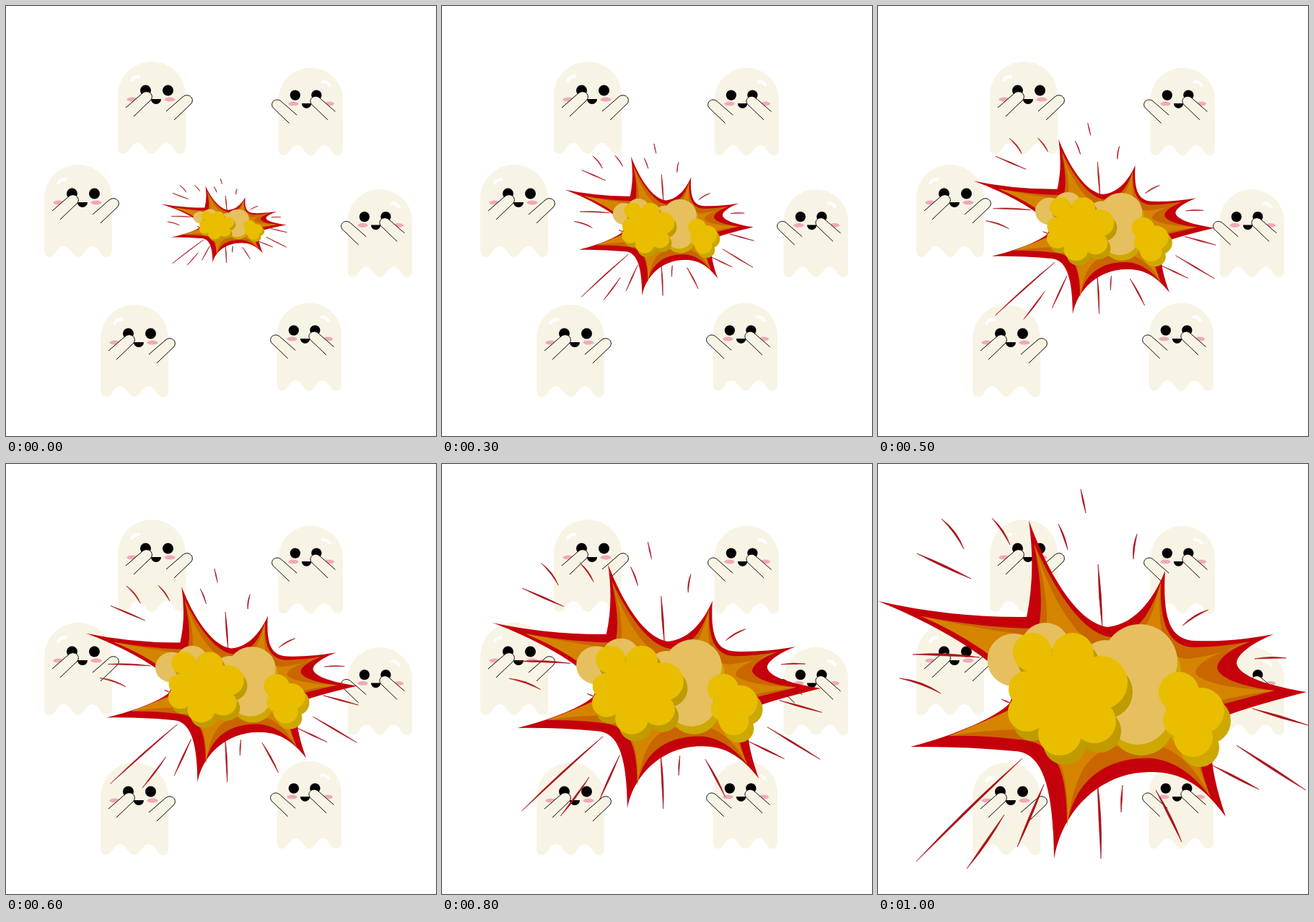
An HTML page that plays this animation: 596 by 596 pixels, repeating every 1100 ms.

```html
<!DOCTYPE html>
<html>
<head>
<meta charset="utf-8">
<style>
  html, body { margin: 0; width: 100%; height: 100%; overflow: hidden; background: #fff; }
  svg { display: block; width: 100vw; height: 100vh; }
</style>
</head>
<body>
<svg viewBox="0 0 596 596">
  <defs>
    <g id="arm" fill="#f8f4e5" stroke="#000">
      <path d="M11 64L34 44C41 38 51 45 46 53L22 76"/>
    </g>
    <g id="ghost">
      <path fill="#f8f4e5" d="M0 47A47 47 0 0 1 94 47V119Q94 128 86 128C78 128 76 113 67 113S55 128 47 128S36 113 27 113S16 128 8 128Q0 128 0 119Z"/>
      <path d="M19.500 25.500Q23 20 29 20.500" fill="none" stroke="#fff" stroke-width="4.500" stroke-linecap="round"/>
      <g fill="#f0a9b9">
        <ellipse cx="20" cy="52.500" rx="7.500" ry="3"/>
        <ellipse cx="72" cy="52.500" rx="7.500" ry="3"/>
      </g>
      <circle cx="38.500" cy="40" r="7.500"/>
      <circle cx="69.500" cy="40" r="7.500"/>
      <path d="M46 52H60A7 7 0 0 1 46 52"/>
      <use href="#arm"/>
      <use href="#arm" x="56" y="5"/>
    </g>
    <g id="puff">
      <circle cx="214" cy="261" r="27"/>
      <circle cx="270" cy="263" r="29"/>
      <circle cx="309" cy="303" r="37"/>
      <circle cx="300" cy="357" r="30"/>
      <circle cx="252" cy="374" r="30"/>
      <circle cx="207" cy="344" r="27"/>
      <circle cx="206" cy="312" r="25"/>
      <circle cx="250" cy="315" r="50"/>
    </g>
    <g id="smallPuff">
      <circle cx="417" cy="316" r="28"/>
      <circle cx="448" cy="342" r="32"/>
      <circle cx="437" cy="379" r="27"/>
      <circle cx="418" cy="355" r="23"/>
    </g>
    <g id="column">
      <circle cx="363" cy="274" r="52"/>
      <circle cx="360" cy="344" r="45"/>
      <path d="M315 274H414L404 344H315Z"/>
    </g>
  </defs>

  <use href="#ghost" x="155" y="77"/>
  <use href="#ghost" x="53" y="220"/>
  <use href="#ghost" x="131" y="414"/>
  <use href="#ghost" transform="translate(467 85.500) scale(-.952 .952)"/>
  <use href="#ghost" transform="translate(563 254) scale(-.952 .952)"/>
  <use href="#ghost" transform="translate(465 411.500) scale(-.952 .952)"/>

  <g id="burst">
    <path id="rays" fill="#a91319" stroke="#a91319" stroke-width=".6" vector-effect="non-scaling-stroke"/>
    <path fill="#c4000b" d="M0 190Q100 213 206 212Q219 150 209 78C235 150 275 220 318 226C360 222 385 180 398 148C394 215 405 244 440 245Q490 247 548 236C515 250 497 265 497 276C500 295 545 308 594 316Q520 335 485 348C455 360 455 410 482 489C450 445 420 427 380 427C310 425 255 480 244 547C243 480 238 400 190 398Q120 391 45 392C110 375 165 350 182 332Q192 312 182 300C150 265 80 222 0 190Z"/>
    <path fill="#c96600" d="M60 211Q150 228 222 228Q232 190 216 110C245 175 285 238 325 240C365 236 382 195 392 164C390 225 405 254 440 254Q480 253 515 246C485 258 470 272 470 283C475 300 515 310 550 314Q470 335 450 340Q430 380 461 462C430 420 400 410 380 408C310 405 270 445 262 503C262 440 255 385 195 382Q150 376 98 377Q190 350 210 330V300Q150 250 60 211Z"/>
    <path fill="#d58400" d="M60 211Q160 233 232 240Q240 190 216 110C240 190 280 255 325 260C370 250 382 205 392 164C385 240 400 270 430 270Q475 265 515 246C470 262 440 275 440 290C450 305 500 312 550 314Q470 325 440 340Q425 380 461 462C430 400 390 385 370 390C300 385 275 410 262 503C268 420 240 370 200 368Q150 368 98 377Q190 340 220 320Q150 250 60 211Z"/>
    <use href="#column" x="5" y="15" fill="#cda800"/>
    <g fill="#e6bf5f">
      <circle cx="188" cy="271.500" r="36.500"/>
      <circle cx="232" cy="254" r="34"/>
      <circle cx="315" cy="277" r="33"/>
      <use href="#column"/>
    </g>
    <use href="#puff" x="7" y="13" fill="#bf9b00"/>
    <use href="#puff" fill="#e9bd00"/>
    <use href="#smallPuff" x="9" y="14" fill="#cda800"/>
    <use href="#smallPuff" fill="#e9bd00"/>
  </g>
</svg>
<script>
  // Each ray: start x, y, end x, y, sideways bend.
  const rays = [
    [281, 35, 288, 68, 0], [88, 76, 119, 118, -6], [158, 75, 183, 112, -4],
    [250, 83, 263, 119, -2], [359, 97, 354, 132, 3], [54, 124, 129, 159, 0],
    [305, 139, 311, 228, 0], [458, 202, 422, 224, 4], [522, 270, 566, 269, -2],
    [48, 264, 141, 268, -3], [30, 297, 87, 318, -6], [519, 339, 596, 362, 0],
    [171, 326, 185, 332, 0], [497, 390, 593, 452, 0], [464, 418, 528, 451, 0],
    [200, 408, 53, 551, 3], [175, 486, 123, 561, -2], [230, 444, 193, 531, 0],
    [304, 440, 309, 547, -2], [339, 445, 337, 483, 1], [385, 452, 421, 524, -2]
  ];

  function rayPath([x1, y1, x2, y2, bend]) {
    const length = Math.hypot(x2 - x1, y2 - y1);
    const nx = (y1 - y2) / length, ny = (x2 - x1) / length;
    const width = Math.min(3, 1 + length / 40);
    const control = d => `${(x1 + x2) / 2 + nx * d} ${(y1 + y2) / 2 + ny * d}`;
    return `M${x1} ${y1}Q${control(bend + width)} ${x2} ${y2}Q${control(bend - width)} ${x1} ${y1}Z`;
  }
  document.getElementById('rays').setAttribute('d', rays.map(rayPath).join(''));

  // Poses: step, left and right tip x, top and bottom tip y.
  const poses = [
    [0, 215, 389, 249, 356], [2, 186, 416, 218, 390], [4, 154, 447, 199, 413],
    [6, 111, 487, 170, 441], [8, 70, 525, 139, 478], [9, 32, 562, 114, 506],
    [10, 0, 594, 78, 547]
  ];
  const burst = document.getElementById('burst');

  function draw(now) {
    const step = Math.floor(now % 1100 / 100);
    const i = Math.max(1, poses.findIndex(p => p[0] >= step));
    const a = poses[i - 1], b = poses[i];
    const k = (step - a[0]) / (b[0] - a[0]);
    const [, left, right, top, bottom] = a.map((v, n) => v + (b[n] - v) * k);
    const sx = (right - left) / 594, sy = (bottom - top) / 469;
    burst.setAttribute('transform', `matrix(${sx} 0 0 ${sy} ${left} ${top - 78 * sy})`);
  }

  const start = performance.now();
  function tick() {
    draw(performance.now() - start);
    requestAnimationFrame(tick);
  }
  tick();
</script>
</body>
</html>
```
